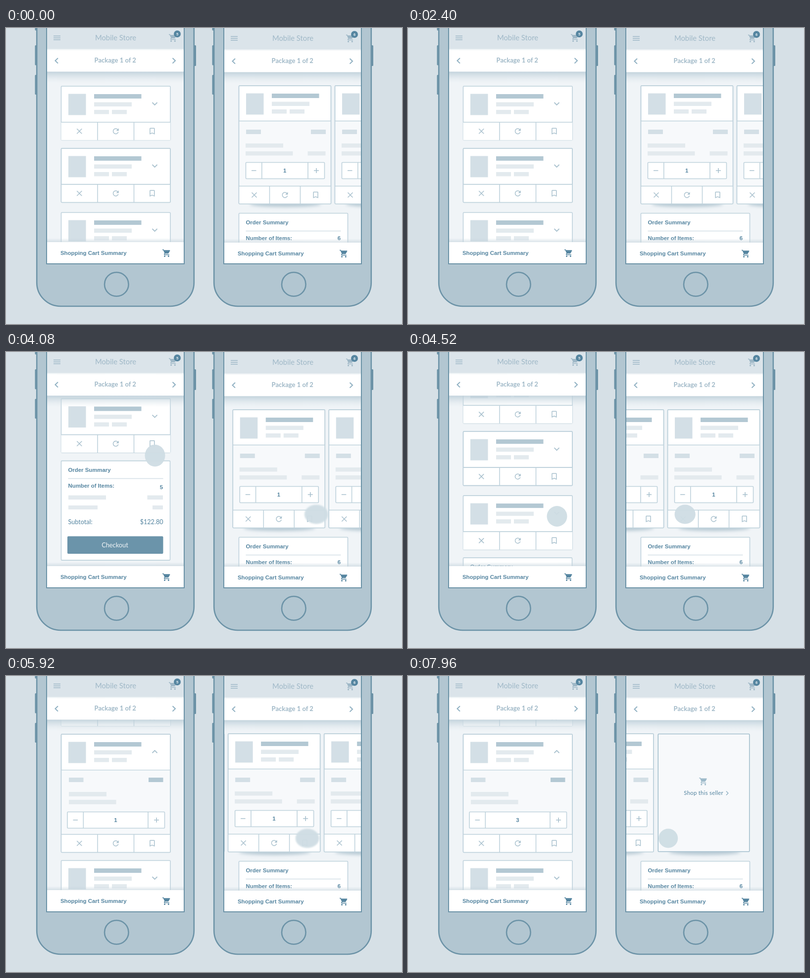
An HTML page for the animation above (8 s loop, 800x600 px).

```html
<!DOCTYPE html>
<html lang="en">
<head>
<meta charset="utf-8">
<title>Cart screens</title>
<style>
  html, body { margin: 0; width: 100%; height: 100%; overflow: hidden; background: #d6e0e6; }
  svg { display: block; width: 800px; height: 600px; }
  text { font-family: Lato, "Open Sans", sans-serif; fill: #5585a0; }
  .b { font: bold 11.4px "Liberation Sans", Arial, sans-serif; }
  .mid { text-anchor: middle; }
  .end { text-anchor: end; }
</style>
</head>
<body>
<svg id="stage" viewBox="0 0 800 600" xmlns="http://www.w3.org/2000/svg"></svg>
<script>
const LOOP = 8000, W = 277;
const EDGE = '#bfd2dc', ICON = '#a9c1ce', DARK = '#5585a0', FRAME = '#6c93a7';
const PALE = '#e3eaee', SOFT = '#d3dfe6', BAR = '#b3c8d3', PANEL = '#f7f9fb';

// Markup helpers
const rect = (x, y, w, h, fill, more = '') =>
  `<rect x="${x}" y="${y}" width="${w}" height="${h}" fill="${fill}" ${more}/>`;
const frame = (x, y, w, h, fill = '#fff', more = '') =>
  rect(x, y, w, h, fill, `stroke="${EDGE}" stroke-width="1.6" rx="1.5" ${more}`);
const line = (d, color = EDGE, width = 1.6) =>
  `<path d="${d}" fill="none" stroke="${color}" stroke-width="${width}"/>`;
const text = (x, y, s, cls = '', more = '') =>
  `<text x="${x}" y="${y}" class="${cls}" ${more}>${s}</text>`;
const group = (x, y, body, more = '') =>
  `<g transform="translate(${x} ${y})" ${more}>${body}</g>`;
const icon = (d, x, y, scale, fill) =>
  `<path d="${d}" fill="${fill}" transform="translate(${x} ${y}) scale(${scale})"/>`;

const CART = 'M7 18a2 2 0 1 0 0 4a2 2 0 1 0 0-4zM1 2v2h2l3.6 7.6-1.35 2.45C4.5 15.4 5.5 17 7 17h12v-2H7.4c-.2 0-.3-.2-.2-.4l.9-1.6h7.45c.75 0 1.4-.4 1.75-1l3.6-6.5c.4-.7-.1-1.5-.9-1.5H5.2l-.94-2zM17 18a2 2 0 1 0 0 4a2 2 0 1 0 0-4z';
const RELOAD = 'M17.65 6.35A8 8 0 1 0 19.73 14h-2.08A6 6 0 1 1 16.22 7.78L13 11h7V4z';
const MARK = 'M17 3H7a2 2 0 0 0-2 2v16l7-3 7 3V5a2 2 0 0 0-2-2zm0 15l-5-2.2L7 18V5h10z';
const cart = (x, y, color) => icon(CART, x - .8, y - 1.5, .77, color);

const product = () =>
  rect(14.5, 15.5, 35.5, 43, SOFT) + rect(66.5, 16, 95.5, 9, BAR) +
  rect(66.5, 32.5, 76, 8.5, PALE) + rect(66.5, 48, 30, 8.5, PALE) + rect(102.5, 48, 30, 8.5, PALE);

const actions = (w, h) => {
  const a = w / 6, m = h / 2;
  return rect(0, 0, w, h, '#fff') +
    line(`M0 0H${w}M${2 * a} 0V${h}M${4 * a} 0V${h}`) +
    line(`M${a - 5} ${m - 5}l10 10m0-10l-10 10`, ICON, 1.5) +
    icon(RELOAD, 3 * a - 9, m - 9, .75, ICON) +
    icon(MARK, 5 * a - 8.8, m - 9, .74, ICON);
};

const quantity = (x, y, w, id = '') => {
  const r = w - 33.5, m = 16.5;
  return group(x, y, frame(0, 0, w, 33) + line(`M32.3 0V33M${r} 0V33`) +
    line(`M11.5 ${m}h9.5M${r + 12} ${m}h10m-5-5v10`, ICON, 1.6) +
    text((32 + r) / 2, 20.3, '1', 'b mid', id));
};

const compactCard = (y, id) => group(111.5, y,
  frame(0, 0, 220.5, 109.5) + product() +
  line('M184 33l5 5 5-5', ICON, 1.8) + group(0, 73, actions(220.5, 36.5)), id);

const growingCard = () => group(111.5, 244,
  frame(0, 0, 220.5, 109.5, '#fff', 'id="growBox"') + product() +
  `<g id="chevron">${line('M-5 -2.5l5 5 5-5', ICON, 1.8)}</g>` +
  `<g clip-path="url(#growClip)">${rect(.8, 72.5, 219, 140, PANEL)}${line('M0 72.5H220.5')}
    ${rect(15.5, 88, 29.5, 9, SOFT)}${rect(176.5, 88, 29.5, 9, BAR)}
    ${rect(15.5, 117, 76, 9, PALE)}${rect(15.5, 133, 95.5, 9, PALE)}
    ${quantity(12.5, 157.5, 196.5, 'id="count"')}</g>` +
  `<g id="growFoot">${actions(220.5, 36.5)}</g>` +
  frame(0, 0, 220.5, 109.5, 'none', 'id="growEdge"'));

const wideCard = x => group(x, 117,
  `<ellipse cx="94" cy="240" rx="72" ry="6" fill="#b9cbd5" filter="url(#soft)"/>` +
  frame(0, 0, 186, 239.5) + product() + rect(.8, 71.5, 184.4, 132, PANEL) + line('M0 71.5H186') +
  rect(14.5, 89, 30, 9, SOFT) + rect(145.5, 89, 30, 9, SOFT) +
  rect(13.5, 117, 76, 8.5, PALE) + rect(13.5, 133, 95.5, 8.5, PALE) + rect(139, 133, 36, 8.5, PALE) +
  quantity(14, 155.5, 159) + group(0, 203.5, actions(186, 36)) + frame(0, 0, 186, 239.5, 'none'));

const shopPanel = x => group(x, 117,
  `<ellipse cx="94" cy="240" rx="72" ry="6" fill="#b9cbd5" filter="url(#soft)"/>` +
  rect(0, .5, 184.5, 238.5, PANEL, 'stroke="#a3bfcd" stroke-width="1.6" rx="1.5"') +
  cart(83, 89, '#9dbaca') +
  text(52, 124.3, 'Shop this seller', '', 'font-size="11.4" letter-spacing=".25"') +
  line('M137.5 116.5l4 4-4 4', '#8fb0c2', 1.4));

const summary = (x, y, items) => group(x, y,
  frame(0, 0, 220, 201.5) + text(14, 22.3, 'Order Summary', 'b') +
  line('M14 36H206', SOFT, 1.5) + text(14, 54.3, 'Number of Items:', 'b') +
  text(205.5, items === 5 ? 57.5 : 54.3, items, 'b end') +
  rect(14.5, 70, 76, 8.5, PALE) + rect(174, 70, 31.5, 8.5, PALE) +
  rect(14.5, 90.5, 59, 8, PALE) + rect(184.5, 90.5, 21, 8, PALE) +
  text(14, 128, 'Subtotal:', '', 'font-size="12.6"') +
  text(206, 128, '$122.80', 'end', 'font-size="12.6"') +
  rect(12.5, 153, 193.5, 35.5, '#6b94aa', 'rx="2"') +
  text(108.5, 175, 'Checkout', 'mid', 'font-size="12.8" style="fill:#f2f6f8"'));

const chrome = (badge, id) =>
  rect(83, 88, W, 24, 'url(#under)') + rect(82, -5, 279, 48, '#dbe4ea') +
  rect(82, 42, 279, 46.5, '#fff') + rect(82, 42, 279, 5, 'url(#thin)') +
  line('M96 16.2h14M96 20h14M96 23.8h14', '#9fb8c7', 1.6) +
  text(221.5, 24.5, 'Mobile Store', 'mid', 'font-size="14.8" style="fill:#9fb8c7"') +
  cart(329, 12.5, '#9fb8c7') + `<circle cx="346" cy="12" r="7" fill="${DARK}"/>` +
  text(346, 14.7, badge, 'b mid', 'style="fill:#e6eef2;font-size:7.5px"') +
  line('M105 61l-5.5 5.3 5.5 5.3M336.5 61l5.5 5.3-5.5 5.3', '#8fb0c2', 2) +
  text(220.7, 70.2, 'Package 1 of 2', 'mid',
    `id="${id}" font-size="13" font-weight="700" style="fill:#9fb8c7"`) +
  rect(83, 426, W, 8, 'url(#over)') + rect(82, 434, 279, 46, '#fff') +
  text(110, 460, 'Shopping Cart Summary', 'b') + cart(316, 448.7, DARK);

const phone = (dx, dy, key, badge, content) => group(dx, 0,
  [[58.5, -20, 25], [58.5, 35, 40.5], [58.5, 95, 40], [379.5, 35, 42]]
    .map(([x, y, h]) => rect(x, y, 4.5, h, FRAME, 'rx="1.5"')).join('') +
  rect(62.2, -80, 317.6, 644, '#b2c6d1', `rx="48" stroke="${FRAME}" stroke-width="2.6"`) +
  `<circle cx="223.3" cy="519.5" r="24.3" fill="none" stroke="${FRAME}" stroke-width="2.6"/>` +
  `<g clip-path="url(#screen)">${rect(82, -5, 280, 490, '#f0f4f7')}
    <g id="${key}Page"><g id="${key}Pack">${content}</g></g>
    <use href="#${key}Pack" id="${key}Next"/>
    ${group(0, dy, chrome(badge, key + 'Title'))}
    <ellipse id="${key}Touch" fill="#cfdde4"/></g>` +
  rect(82, -10, 278, 488, 'none', `stroke="${FRAME}" stroke-width="2"`));

const fade = (id, a, b, from, to) =>
  `<linearGradient id="${id}" x2="0" y2="1"><stop stop-color="${a}" stop-opacity="${from}"/>
   <stop offset="1" stop-color="${b}" stop-opacity="${to}"/></linearGradient>`;

document.getElementById('stage').innerHTML = `<defs>
  <clipPath id="screen"><rect x="82" y="-5" width="278" height="483"/></clipPath>
  <clipPath id="growClip"><rect id="growMask" x="0" y="72" width="221" height="0"/></clipPath>
  <filter id="soft" x="-20%" y="-150%" width="140%" height="400%"><feGaussianBlur stdDeviation="3"/></filter>
  ${fade('under', '#b9ccd7', '#dfe8ed', .85, 0)}${fade('thin', '#cbd9e1', '#fff', .6, 0)}
  ${fade('over', '#c3d2db', '#c3d2db', 0, .6)}</defs>` +
  rect(0, 0, 800, 600, '#d6e0e6') +
  phone(0, 0, 'left', 5, `<g id="list">${compactCard(118)}${growingCard()}
    <g id="below">${compactCard(374)}${summary(111.5, 500, 5)}</g></g>`) +
  phone(358, 1, 'right', 6, group(-358, 0,
    `<g id="cards">${[0, 1, 2].map(i => wideCard(470.5 + 194 * i)).join('')}${shopPanel(1053.8)}</g>` +
    summary(470.5, 375.5, 6)));

const $ = id => document.getElementById(id);
const move = (id, x, y) => $(id).setAttribute('transform', `translate(${x} ${y})`);
const set = (id, attrs) => { for (const k in attrs) $(id).setAttribute(k, attrs[k]); };

// Smooth monotone curve through [time, value] keys, flat at both ends.
function curve(keys, t) {
  const n = keys.length - 1;
  if (t <= keys[0][0]) return keys[0][1];
  if (t >= keys[n][0]) return keys[n][1];
  const slope = i => (keys[i + 1][1] - keys[i][1]) / (keys[i + 1][0] - keys[i][0]);
  const tangent = i => {
    if (i === 0 || i === n) return 0;
    const a = slope(i - 1), b = slope(i);
    return a * b > 0 ? 2 * a * b / (a + b) : 0;
  };
  const i = keys.findIndex(k => k[0] > t) - 1;
  const [t0, a] = keys[i], [t1, b] = keys[i + 1];
  const d = t1 - t0, u = (t - t0) / d, v = 1 - u;
  return a * (1 + 2 * u) * v * v + b * (3 - 2 * u) * u * u + d * u * v * (tangent(i) * v - tangent(i + 1) * u);
}

const PAGE = [[960, 0], [1420, 1], [1960, 1], [2380, 0]];
const SCROLL = [[2920, 0], [3180, 130], [3680, 281], [4060, 281], [4340, 150], [4880, 0], [5240, 0], [5820, 126]];
const GROW = [[5240, 0], [5820, 1]];
const SWIPE = [[4000, 0], [4080, 12], [4400, 125], [4960, 174.8], [5240, 194], [5860, 194], [5920, 215.5],
  [6240, 325], [6720, 388], [6860, 388], [7140, 480], [7740, 548.5]];

// Each touch: start, end, x keys, y keys
const still = v => [[0, v]];
const TOUCHES = {
  left: [
    [880, 1320, still(340), still(66)],
    [1880, 2280, still(102), still(66)],
    [2720, 3560, still(301), [[2920, 333.5], [3420, 205]]],
    [3840, 4640, still(301), [[4040, 209], [4080, 210], [4520, 333]]],
    [5040, 5400, still(301), still(279)],
    [6320, 6600, still(302), still(291.5)],
    [6880, 7200, still(302), still(291.5)]
  ],
  right: [
    [880, 1320, still(339), still(67)],
    [1880, 2280, still(102), still(67)],
    [3720, 5240, [[3980, 282], [4080, 269], [4400, 210], [4960, 181], [5160, 169]], still(329)],
    [5700, 6520, [[5850, 276], [5920, 251], [6240, 190], [6480, 167]], still(329)],
    [6720, 7520, [[6860, 276], [7140, 196], [7440, 167]], still(329)],
    [7900, 8200, still(167.7), still(329)]
  ]
};

function drawTouch(key, t) {
  const hit = TOUCHES[key].find(([a, b]) => t >= a && t < b);
  if (!hit) return set(key + 'Touch', { opacity: 0 });
  const [a, b, xs, ys] = hit;
  const speed = keys => Math.abs(curve(keys, t + 20) - curve(keys, t - 20));
  const stretch = keys => Math.min(4.5, speed(keys) * .7);
  const blur = Math.min(1.5, (speed(xs) + speed(ys)) * .25);
  set(key + 'Touch', {
    cx: curve(xs, t), cy: curve(ys, t),
    rx: (key === 'left' ? 20.5 : 19.5) + stretch(xs), ry: (key === 'left' ? 20.5 : 19.5) + stretch(ys),
    opacity: .94 * Math.min(1, (t - a + 20) / 40, (b - t) / 100),
    style: blur > .2 ? `filter:blur(${blur}px)` : ''
  });
}

function render(t) {
  const page = curve(PAGE, t), grow = curve(GROW, t);
  for (const key of ['left', 'right']) {
    const rest = key === 'left' ? 1.5 : 0;
    move(key + 'Page', -W * page, 0);
    move(key + 'Next', W + (rest - W) * page, 0);
    set(key + 'Page', { visibility: page < 1 ? 'visible' : 'hidden' });
    $(key + 'Next').style.display = page > 0 ? '' : 'none';
    $(key + 'Title').textContent = `Package ${page > .5 ? 2 : 1} of 2`;
    drawTouch(key, t);
  }
  move('list', 0, -curve(SCROLL, t));
  move('below', 0, 126 * grow);
  move('cards', -curve(SWIPE, t), 0);

  const height = 109.5 + 130 * grow;
  set('growBox', { height });
  set('growEdge', { height });
  set('growMask', { height: Math.max(0, height - 108.5) });
  move('growFoot', 0, height - 36.5);
  set('chevron', { transform: `translate(189 35.5) scale(1 ${1 - 2 * grow})` });
  $('count').textContent = t < 6440 ? 1 : t < 7040 ? 2 : 3;
}

const start = performance.now();
function tick() {
  render((performance.now() - start) % LOOP);
  requestAnimationFrame(tick);
}
tick();
</script>
</body>
</html>
```
